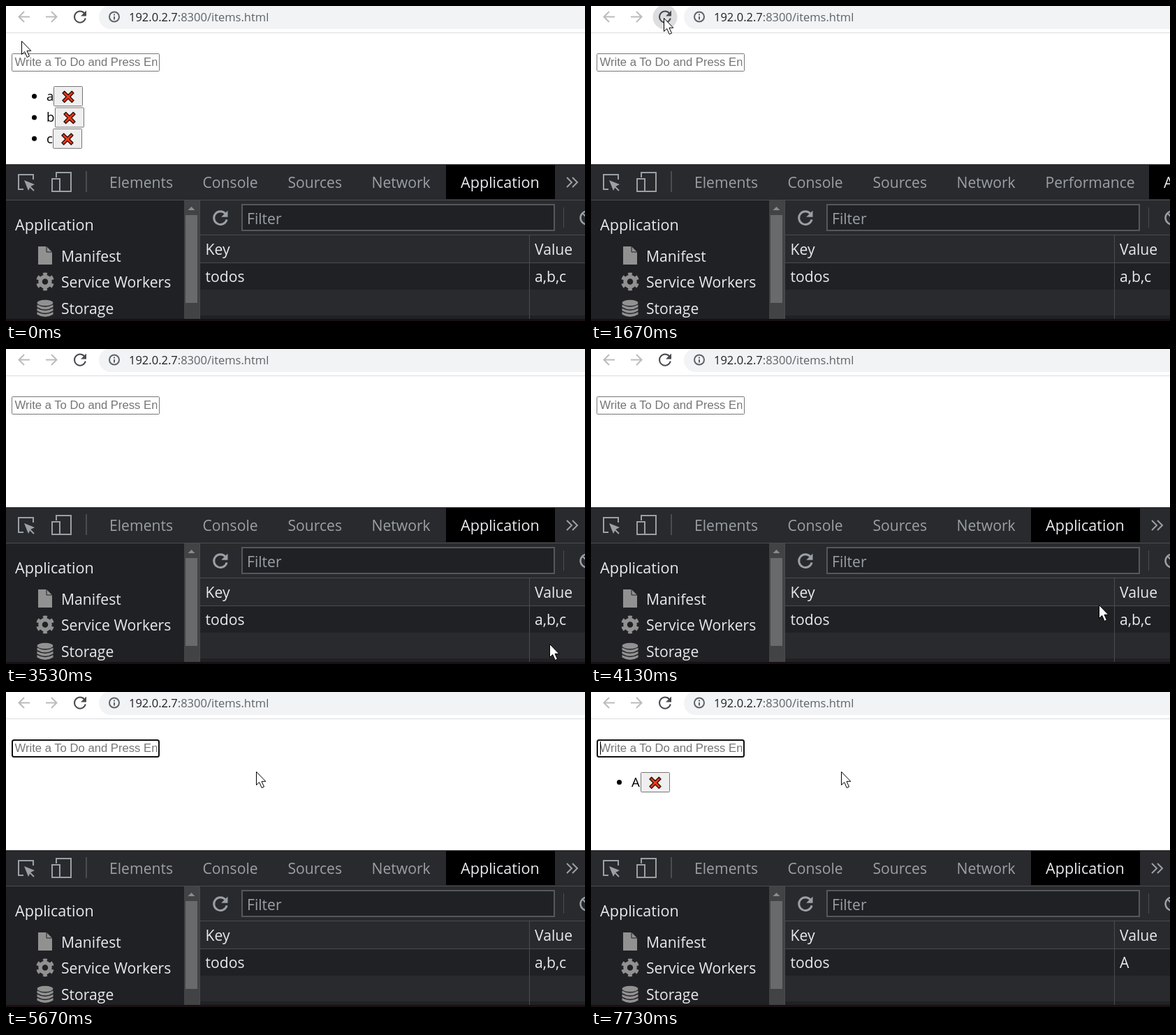
An HTML page that plays this animation: 829 by 452 pixels, repeating every 8000 ms.

```html
<!DOCTYPE html>
<html lang="en">
<head>
<meta charset="utf-8">
<title>To-do list and storage panel</title>
<style>
  html, body { margin: 0; width: 100%; height: 100%; overflow: hidden; background: #fff; }
  svg { display: block; font: 21.15px "Open Sans", "Noto Sans", sans-serif; }
  .app { font-size: 21.6px; }
  .list { font-size: 18.7px; }
  .field { font: 16.67px "Liberation Sans", Arial, sans-serif; }
  .url { font-size: 16.5px; }
  .tabs text, .filter { fill: #9aa0a6; }
  .tabs .on, .panel { fill: #e8eaed; }
  .line { fill: none; stroke-width: 2; }
  .rule { stroke: #494c50; }
</style>
</head>
<body>
<svg width="829" height="452" viewBox="0 0 829 452">
  <defs>
    <clipPath id="inner"><rect x="11" y="69" width="205.5" height="24"/></clipPath>
    <g id="reload">
      <path fill="none" d="M6.2 -5A8 8 0 1 0 7.8 2"/>
      <path d="M9 -9V-1H1Z" stroke="none"/>
    </g>
    <path id="cross" d="M-8 -5.3L-5.3 -8 0 -2.8 5.3 -8 8 -5.3 2.8 0 8 5.3 5.3 8 0 2.8 -5.3 8 -8 5.3 -2.8 0Z"
      fill="#f03a17" stroke="#30100a" stroke-width="1.4" stroke-linejoin="round"/>
  </defs>

  <!-- browser bar -->
  <g class="line" stroke="#babcbe">
    <path d="M34 15.500H18M26 8L18.500 15.500L26 23"/>
    <path d="M57 15.500H73M65 8L72.500 15.500L65 23"/>
  </g>
  <circle id="halo" cx="106" cy="16" r="17.5" fill="#dddee0"/>
  <use href="#reload" x="106" y="15.500" fill="#484b4f" stroke="#484b4f" stroke-width="2"/>
  <rect x="133" y="-1" width="730" height="34" rx="17" fill="#f1f3f4"/>
  <circle class="line" cx="155" cy="15.500" r="7" stroke="#5f6368"/>
  <path class="line" d="M155 11.500V13.500M155 15V19.500" stroke="#5f6368"/>
  <text class="url" x="176" y="22" fill="#5f6368"><tspan fill="#202124">192.0.2.7</tspan>:8300/items.html</text>
  <path d="M0 38.5H829" stroke="#dadce0"/>

  <!-- page -->
  <rect id="box" fill="#fff"/>
  <g class="field" clip-path="url(#inner)">
    <text id="hint" x="12.5" y="86" fill="#757575">Write a To Do and Press Enter</text>
    <text id="typed" x="12.5" y="86">A</text>
  </g>
  <rect id="caret" y="71" width="1" height="19"/>
  <g id="before" class="list"></g>
  <g id="after" class="list"></g>

  <!-- developer tools -->
  <rect y="227" width="829" height="225" fill="#292a2d"/>
  <g class="line" stroke="#9aa0a6">
    <path d="M25 263H18V242H39V249M40 265L30 255"/>
    <path d="M26 250L41 256L35 259L32 265Z" fill="#9aa0a6" stroke="none"/>
    <path d="M72 246V239H93V266H78"/>
    <rect x="66" y="248" width="11" height="18"/>
  </g>
  <path class="rule" d="M115 237V267" stroke-width="2"/>
  <g class="tabs">
    <text x="148" y="261">Elements</text>
    <text x="281.500" y="261">Console</text>
    <text x="403.500" y="261">Sources</text>
    <text x="523.500" y="261">Network</text>
    <g id="narrow">
      <rect x="630" y="228" width="156" height="49"/>
      <text class="app on" x="651" y="261">Application</text>
      <path class="line" d="M803 246L810 253L803 260M811 246L818 253L811 260" stroke="#9aa0a6"/>
    </g>
    <g id="wide">
      <text x="650.500" y="261">Performance</text>
      <rect x="799" y="228" width="30" height="49"/>
      <text class="app on" x="820" y="261">Application</text>
    </g>
  </g>

  <g class="panel">
    <rect y="278" width="277" height="171" fill="#202124"/>
    <text class="app" x="13" y="322">Application</text>
    <text x="79" y="367">Manifest</text>
    <text x="79" y="404">Service Workers</text>
    <text x="79" y="442">Storage</text>
    <g fill="#919191">
      <path d="M46 345H58L66 353V371H46Z"/>
      <path d="M58 345V353H66" fill="none" stroke="#202124"/>
      <g fill="none" stroke="#919191">
        <circle cx="56" cy="395.500" r="7" stroke-width="5.500"/>
        <circle cx="56" cy="395.500" r="11" stroke-width="4"
          pathLength="60" stroke-dasharray="5 5" stroke-dashoffset="-2.500"/>
      </g>
      <ellipse cx="56" cy="426" rx="11.500" ry="4.200"/>
      <path id="disc" d="M44.500 428.500Q56 435 67.500 428.500V432Q56 439 44.500 432Z"/>
      <use href="#disc" y="5.300"/>
      <use href="#disc" y="10.600"/>
    </g>
    <rect x="255" y="279" width="22" height="170" fill="#424345"/>
    <rect x="257" y="300" width="17" height="126" fill="#696a6b"/>
    <path d="M260.500 293L265.500 288L270.500 293Z" fill="#8b8c8e"/>

    <use href="#reload" transform="translate(307 304) scale(1.17)" fill="#9aa0a6" stroke="#9aa0a6" stroke-width="2.500"/>
    <rect class="line" x="338" y="285" width="447" height="37" style="fill:#202124" stroke="#55585b"/>
    <text class="filter" x="345" y="313">Filter</text>
    <circle cx="832" cy="304" r="9.500" fill="none" stroke="#9aa0a6" stroke-width="2.500"/>
    <path class="line" d="M825 297L839 311" stroke="#9aa0a6"/>

    <rect x="277" y="369" width="552" height="38" fill="#202124"/>
    <rect x="277" y="444" width="552" height="5" fill="#202124"/>
    <path class="rule" d="M0 278.500H829M277.500 279V449M277 328.500H829M277 368.500H829M749.500 329V449M798.500 289V318"/>
    <text x="285.500" y="357">Key</text>
    <text x="757" y="357">Value</text>
    <text x="285.500" y="396">todos</text>
    <text id="value" x="757" y="396"></text>
    <rect y="449" width="829" height="3" fill="#1a0f13"/>
  </g>

  <path id="arrow" d="M.5 .5V19.500L4.700 15.500L8.200 23.500L11.500 22L8 14.300H13.800Z" fill="#fff" stroke="#000"/>
  <path id="beam" class="line" d="M-4 -8.500H-1L0 -7.500L1 -8.500H4M0 -8V8M-4 8.500H-1L0 7.500L1 8.500H4" stroke="#000"/>
</svg>

<script>
const LOOP = 8000, FPS = 15;
const el = id => document.getElementById(id);
const show = (id, on) => el(id).style.display = on ? '' : 'none';
const attrs = (id, o) => { for (const n in o) el(id).setAttribute(n, o[n]); };

// pointer path: step, x, y
const path = [
  [0, 22, 50], [5, 50, 92], [8, 86, 119], [11, 111, 68], [13, 105, 18], [14, 104, 17],
  [27, 104, 17], [31, 108, 72], [34, 116, 125], [37, 118, 112], [39, 113, 96],
  [40, 112, 89], [41, 111, 86], [42, 110, 84], [44, 110, 84], [46, 190, 115], [49, 500, 270],
  [51, 690, 370], [53, 778, 423], [54, 778, 423], [58, 797, 395], [61, 770, 378],
  [64, 640, 345], [67, 443, 281], [69, 240, 165], [71, 128, 93], [74, 118, 82],
  [76, 118, 82], [80, 210, 116], [82, 290, 126], [85, 358, 114], [120, 358, 114]
];

function pointer(k) {
  const i = path.findIndex(p => p[0] > k);
  const [k0, x0, y0] = path[i - 1], [k1, x1, y1] = path[i];
  const f = (k - k0) / (k1 - k0);
  return [x0 + (x1 - x0) * f, y0 + (y1 - y0) * f];
}

function item(text, x, row) {
  const y = 115 + row * 30.4;
  return `<circle cx="40.5" cy="${y + 14.5}" r="3.5"/><text x="58" y="${y + 21}">${text}</text>
    <rect x="${x + .5}" y="${y + .5}" width="41" height="28" rx="1" fill="#efefef" stroke="#767676"/>
    <use href="#cross" x="${x + 21}" y="${y + 15.2}"/>`;
}
el('before').innerHTML = item('a', 68, 0) + item('b', 70, 1) + item('c', 67, 2);
el('after').innerHTML = item('A', 71, 0);
const firstButton = el('before').querySelector('rect');

function draw(k) {
  const [x, y] = pointer(k);
  const inside = (l, t, r, b) => x >= l && x < r && y >= t && y < b;
  const overField = inside(8, 68, 220, 95), hover = inside(8, 68, 220, 93);
  const focus = k >= 76, typing = k >= 100 && k < 112, added = k >= 112;
  const loading = k >= 24 && k < 26;

  show('halo', inside(88, 0, 124, 34));
  show('before', k < 23);
  show('after', added);
  show('narrow', !loading);
  show('wide', loading);
  show('hint', !typing);
  show('typed', typing);
  show('caret', focus && (k < 84 || k >= 92 && k < 108 || k >= 116));
  attrs('caret', { x: typing ? 23 : 13 });
  const w = focus ? 2 : 1;
  attrs('box', {
    x: 8 + w / 2, y: 68 + w / 2, width: 212 - w, height: 26 - w, rx: focus ? 2.5 : 1,
    stroke: focus ? '#101010' : hover ? '#4f4f4f' : '#767676', 'stroke-width': w
  });
  firstButton.setAttribute('fill', inside(68, 115, 110, 144) ? '#e5e5e5' : '#efefef');
  el('value').textContent = added ? 'A' : 'a,b,c';

  show('arrow', !overField);
  show('beam', overField);
  attrs('arrow', { transform: `translate(${Math.round(x)} ${Math.round(y)})` });
  attrs('beam', { transform: `translate(${Math.round(x)} ${Math.round(y) + 4.5})` });
}

function tick() {
  const t = performance.now() % LOOP;
  draw(Math.min(119, Math.floor(t * FPS / 1000 + .06)));
  requestAnimationFrame(tick);
}
tick();
</script>
</body>
</html>
```
